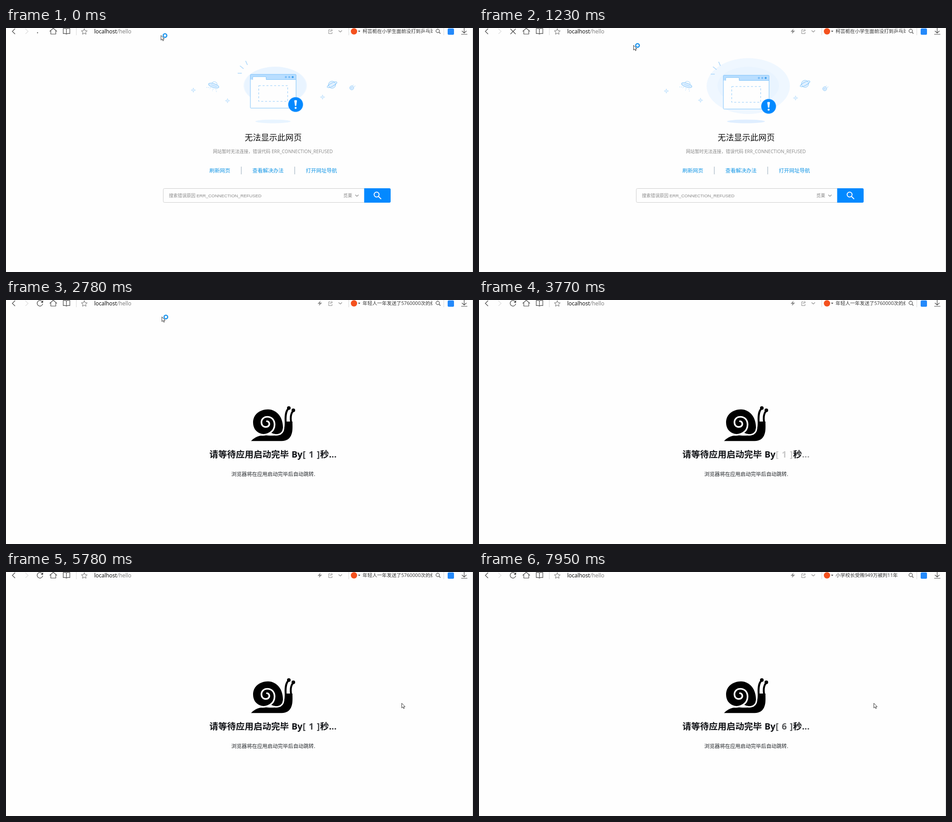
Animation of 1032x542 px, one loop 8000 ms. Source, as an HTML page:

```html
<!DOCTYPE html>
<html lang="zh">
<head>
<meta charset="utf-8">
<style>
html, body { margin: 0; width: 100%; height: 100%; overflow: hidden; background: #fefefe; }
svg { display: block; width: 1032px; height: 542px; font-family: "Open Sans", "Noto Sans CJK SC", "Noto Sans CJK", sans-serif; }
.line { fill: none; stroke: #444; stroke-width: 1.2; }
.soft { stroke: #888; }
.pale { fill: none; stroke: #a9d6fb; stroke-width: 1; }
.edge { stroke: #78c0fa; }
.cjk { font-family: "Noto Sans CJK SC", "Noto Sans CJK", sans-serif; }
.link { font-size: 11.5px; fill: #1296e6; }
.hint { font-size: 9.75px; fill: #888; }
.big { font-size: 19.5px; font-weight: 700; fill: #101216; }
</style>
</head>
<body>
<svg viewBox="0 0 1032 542">
  <defs>
    <clipPath id="newsClip"><rect x="786" y="0" width="157" height="16"/></clipPath>
    <path id="star4" d="M0-5L1.4-1.4L5 0L1.4 1.4L0 5L-1.4 1.4L-5 0L-1.4-1.4Z" fill="#e3f2ff" stroke="#b8ddfb" stroke-width=".8"/>
  </defs>
  <path d="M1031.5 0V542" stroke="#cfcfcf"/>

  <!-- toolbar -->
  <g class="line">
    <path d="M20 1.5L14 7.5L20 13.5"/>
    <path d="M43 2L49 7.5L43 13" stroke="#ddd"/>
    <path id="loadIcon"/><path id="loadHead" d="M82 .8V6H76.8Z" fill="#444" stroke="none"/>
    <path d="M96.5 7.5L104.500 .5L112.5 7.5M99 6V13.5H110V6"/>
    <path d="M133.5 2Q130 0 126.5 1V12.5Q130 11.5 133.5 13.5Q137 11.5 141 12.5V1Q137 0 133.5 2V13"/>
    <path d="M155.5 0V16M757.5 0V16M967.5 0V16" stroke="#ddd"/>
    <path d="M173 1.5L174.9 6L179.5 6.3L176 9.4L177 14L173 11.5L169 14L170 9.4L166.5 6.3L171.1 6Z" stroke="#666" stroke-width="1"/>
    <path class="soft" d="M717 4H713V12.5H720.5V9M716 9Q716 5 721 5M718.5 2.5L721.5 5L718.5 7.5" stroke-width="1"/>
    <path class="soft" d="M735 5.5L738.7 9L742.5 5.5"/>
    <circle cx="954" cy="6.5" r="3.8"/><path d="M957 9.5L960 12.5"/>
    <path d="M1012.5 0V11M1007.5 6.5L1012.5 11.2L1017.5 6.5M1006 14H1019.5"/>
  </g>
  <path id="bolt" d="M695 1.5L688.5 8.5H692.5L691.5 13L698.5 6H694Z" fill="#909090"/>
  <circle cx="769" cy="7.5" r="7" fill="#f4511e"/>
  <path d="M778 6H783L780.5 9Z" fill="#444"/>
  <rect x="976" y="1" width="14" height="14" rx="2.5" fill="#2389fa"/>
  <text x="195" y="12" font-size="12">localhost<tspan fill="#777">/hello</tspan></text>
  <g clip-path="url(#newsClip)"><text id="news" x="788" font-size="10.7" fill="#333"></text></g>

  <!-- connection error page -->
  <g id="errorPage">
    <ellipse id="halo" cx="595" fill="#eff7ff"/>
    <ellipse cx="595" cy="128" rx="68" ry="42" fill="#e9f4ff"/>
    <ellipse id="shadow" cx="590" cy="207.5" ry="4"/>
    <g data-drift="2">
      <path d="M512 100.5H521M517 84L525 90.5M529.5 73L533.5 82" stroke="#a9d6fb" stroke-width="1.6"/>
      <rect x="540" y="103" width="101" height="75" rx="1.5" fill="#fefefe"/>
      <path d="M540 103H641V114.5H575V108H545V114.5H540Z" fill="#b9deff"/>
      <path class="pale edge" d="M545 115V110Q545 108 547 108H573Q575 108 575 110V114.5H641"/>
      <rect class="pale edge" x="540" y="103" width="101" height="75" rx="1.5"/>
      <g fill="#79bdf8"><circle cx="618.5" cy="109" r="2.3"/><circle cx="626" cy="109" r="2.3"/><circle cx="633.5" cy="109" r="2.3" fill="#409fee"/></g>
      <rect x="558.5" y="128" width="64" height="35" fill="none" stroke="#8cc8fa" stroke-dasharray="4.5 4"/>
    </g>
    <g data-drift="4">
      <circle cx="640" cy="170" r="16.5" fill="#0389ff" stroke="#b5dcff" stroke-width=".7"/>
      <path d="M637 161Q640 159.5 643 161L641.3 173H638.7Z" fill="#fff"/><circle cx="640" cy="177.5" r="2.2" fill="#fff"/>
    </g>
    <g data-drift="2"><use href="#star4" x="414" y="138"/><use href="#star4" x="699.5" y="153.5"/></g>
    <g data-drift="-1">
      <use href="#star4" x="489.5" y="161.5"/>
      <g transform="translate(459 128) rotate(18)">
        <path d="M-6-2Q-5-9 1-9Q7-8 7-2" class="pale"/>
        <ellipse rx="12" ry="4.5" fill="#d9edff" stroke="#8fcaf8"/><path d="M-6 0H7" class="pale"/>
        <path d="M-5 6L-7 10M1 7V12M7 6L11 13" class="pale" stroke-dasharray="2 2"/>
      </g>
      <path d="M443 132H450" class="pale" stroke-dasharray="2 2"/>
    </g>
    <g data-drift="-2">
      <circle cx="720.5" cy="126" r="8" fill="#e2f1ff" stroke="#8fcaf8"/>
      <ellipse class="pale edge" cx="720.5" cy="126" rx="12" ry="3.5" transform="rotate(-28 720.5 126)"/>
    </g>
    <g data-drift="2">
      <circle cx="764" cy="133" r="4.5" fill="#dceeff" stroke="#9dd0f9"/>
      <path d="M765 129L768 126M768 132L772 128M761 133H766" class="pale"/>
    </g>
    <text class="cjk" x="527.5" y="250" font-size="18" fill="#111">无法显示此网页</text>
    <g class="hint">
      <text class="cjk" x="457.5" y="278">网站暂时无法连接，错误代码</text>
      <text x="587" y="278" font-size="10.1">ERR_CONNECTION_REFUSED</text>
      <text class="cjk" x="360" y="375.5">搜索错误原因</text>
      <text x="421" y="375.5" font-family="Liberation Sans, sans-serif">ERR_CONNECTION_REFUSED</text>
      <text class="cjk" x="745.5" y="375.5">觅栗</text>
    </g>
    <g class="link cjk">
      <text x="449.5" y="321">刷新网页</text><text x="544.5" y="321">查看解决办法</text><text x="662.5" y="321">打开网址导航</text>
    </g>
    <path d="M520 308V325M638 308V325" stroke="#a9b9c6" stroke-width="1.3"/>
    <rect x="347.5" y="356.5" width="502" height="31" rx="3" fill="none" stroke="#ccc"/>
    <path d="M791.5 356H847Q850 356 850 359V385Q850 388 847 388H791.5Z" fill="#0389ff"/>
    <path d="M772 370.5L775.5 374L779 370.5" class="line soft"/>
    <g fill="none" stroke="#fff" stroke-width="1.9"><circle cx="819" cy="370" r="5.5"/><path d="M823 374L829 380"/></g>
  </g>

  <!-- waiting page -->
  <g id="waitPage">
    <path d="M541.5 313.3C550 304 560 301 570 300C590 303 603 301 611 294C616 287 615.500 278 616 270H633C633 280 634 290 631 298C628 308 620 313.3 609 313.3Z"/>
    <path d="M618.2 273C617 260 618.500 247 623.5 242M630.2 273C628 260 630.5 251 634 247" fill="none" stroke="#000" stroke-width="4.2"/>
    <circle cx="625" cy="240" r="4"/><circle cx="635" cy="245" r="4"/>
    <path d="M546 272C546 254 561 243 579 243C597 243 612 259 612 283C612 294 605 298 598 298C592 298 588 296 584 294C577 299 568 299 561 296C551 292 546 283 546 272Z"/>
    <g fill="none" stroke="#fefefe" stroke-width="3.6" stroke-linecap="round">
      <path d="M556 298.5C577 303 593.5 293 593.5 277C593.5 265 586 259.5 577.5 259.5C569 259.5 564.5 265.500 564.5 271.500C564.5 278 568.500 282 574.500 282C580 282 583 277.500 581.5 273C580.500 270.500 578.500 269.300 576.5 269.300"/>
      <path d="M584 296C594 302 612 302 613.5 285L614 273" stroke-width="3"/>
    </g>
    <g class="big">
      <text class="cjk" x="449.5" y="350">请等待应用启动完毕</text>
      <text x="631" y="350">By</text>
      <g id="counter">
        <text x="655.5" y="350">[</text><text id="digit" x="674.5" y="350" text-anchor="middle"></text><text x="687" y="350">]</text>
      </g>
      <text class="cjk" x="694" y="350">秒</text>
      <text class="dot" x="713.7" y="350">.</text><text class="dot" x="719.2" y="350">.</text><text class="dot" x="725" y="350">.</text>
    </g>
    <text class="cjk" x="498" y="390.5" font-size="11.4" fill="#212529">浏览器将在应用启动完毕后自动跳转.</text>
  </g>

  <g id="cursor">
    <path d="M.5.5V11L3 8.7L4.7 12.5L6.3 11.8L4.7 8.2H8Z" fill="#fff" stroke="#222" stroke-width=".9"/>
    <circle id="busy" cx="9.3" cy=".8" r="4" fill="none" stroke="#1d94ec" stroke-width="2.6"/>
  </g>
</svg>
<script>
const LOOP = 8000, FIRST_LOAD = 1400, RELOAD = 6340;
const $ = id => document.getElementById(id);
const set = (el, attrs) => { for (const k in attrs) el.setAttribute(k, attrs[k]); };
const clamp = v => Math.max(0, Math.min(1, v));
const show = (el, on) => set(el, { visibility: on ? 'visible' : 'hidden' });

// Linear interpolation through [time, value] keys.
function track(t, keys) {
  const i = keys.findIndex(k => k[0] > t);
  if (i < 0) return keys[keys.length - 1][1];
  if (!i) return keys[0][1];
  const [a, va] = keys[i - 1], [b, vb] = keys[i];
  return va + (vb - va) * (t - a) / (b - a);
}

const cursorX = [[0, 342], [500, 341], [2700, 341], [3000, 352], [3300, 400], [3900, 760], [4300, 914], [4550, 893],
  [4790, 882], [4940, 882], [5090, 876], [5330, 874], [7250, 874], [7600, 872]];
const cursorY = [[0, 16], [200, 16], [700, 38], [2700, 38], [3000, 34], [3300, 18], [3900, -10], [4400, 280],
  [4550, 294], [4940, 294], [5330, 291]];
const counterFade = [[0, .2], [450, .55], [1000, 1], [1150, 1], [1400, .77], [1620, .7], [2370, .22], [3000, .2]];
const newsY = [[1500, 11], [1800, -5], [1900, -5], [1901, 28], [2360, 11], [7180, 11], [7420, -5],
  [7450, -5], [7451, 28], [7950, 11]];
const headlines = ['柯芸栀在小学生面前没打到乒乓球', '年轻人一年发送了5760000次的红包', '小学校长受贿949万被判11年'];

function arc(from, to) {
  const at = a => `${75 + 6.2 * Math.cos(a)} ${7.3 + 6.2 * Math.sin(a)}`;
  return `M${at(from)}A6.2 6.2 0 ${to - from > Math.PI ? 1 : 0} 1 ${at(to)}`;
}

function drawLoadIcon(t) {
  const start = t < 600, finish = (t > 1490 && t < 1750) || (t > 6550 && t < 7000);
  const cross = (t >= 600 && t <= 1490) || (t > 6100 && t <= 6550);
  let d = arc(.15, 5.6);
  if (start) d = arc(2.45 - t / 300, 2.75 + t / 250);
  else if (cross) d = 'M69.5 2L81 13.5M81 2L69.5 13.5';
  else if (finish) d = arc(0, 3.1);
  set($('loadIcon'), { d, stroke: finish ? '#aaa' : '#444', 'stroke-width': start ? 2 : 1.3 });
  show($('loadHead'), !start && !cross && !finish);
}

function drawNews(t) {
  $('news').textContent = headlines[t < 1900 ? 0 : t < 7450 ? 1 : 2];
  set($('news'), { y: track(t, newsY) });
}

function drawError(t) {
  const drift = (1 - Math.cos(Math.PI * t / 1230)) / 2;
  const grow = clamp(t / 840);
  document.querySelectorAll('[data-drift]').forEach(el =>
    set(el, { transform: `translate(0 ${el.dataset.drift * drift})` }));
  set($('halo'), { cy: 128 + grow, rx: 70 + 22 * grow, ry: 42 + 20 * grow });
  set($('shadow'), { rx: 39 + 3 * drift, fill: drift > .5 ? '#dfeeff' : '#e8f4ff' });
}

function drawWait(t) {
  const age = t - (t < RELOAD ? FIRST_LOAD : RELOAD);
  const phase = age % 3000;
  $('digit').textContent = t < RELOAD ? '1' : '6';
  set($('counter'), { opacity: track(phase, counterFade) });
  document.querySelectorAll('.dot').forEach((dot, i) => {
    const rise = [0, 100, 400][i], fall = [1300, 1050, 1000][i];
    set(dot, { opacity: track(phase, [[rise, .2], [rise + 300, 1], [fall, 1], [2800, .2]]) });
  });
}

function draw(t) {
  const waiting = t >= 1490;
  show($('errorPage'), !waiting);
  show($('waitPage'), waiting);
  show($('bolt'), t >= 1200);
  if (waiting) drawWait(t); else drawError(t);
  drawLoadIcon(t);
  drawNews(t);
  set($('cursor'), {
    transform: `translate(${track(t, cursorX)} ${track(t, cursorY)})`,
    display: t > 3300 && t < 3900 ? 'none' : 'inline'
  });
  show($('busy'), t < 2900);
}

const begin = performance.now();
function tick() {
  draw((performance.now() - begin) % LOOP);
  requestAnimationFrame(tick);
}
tick();
</script>
</body>
</html>
```
